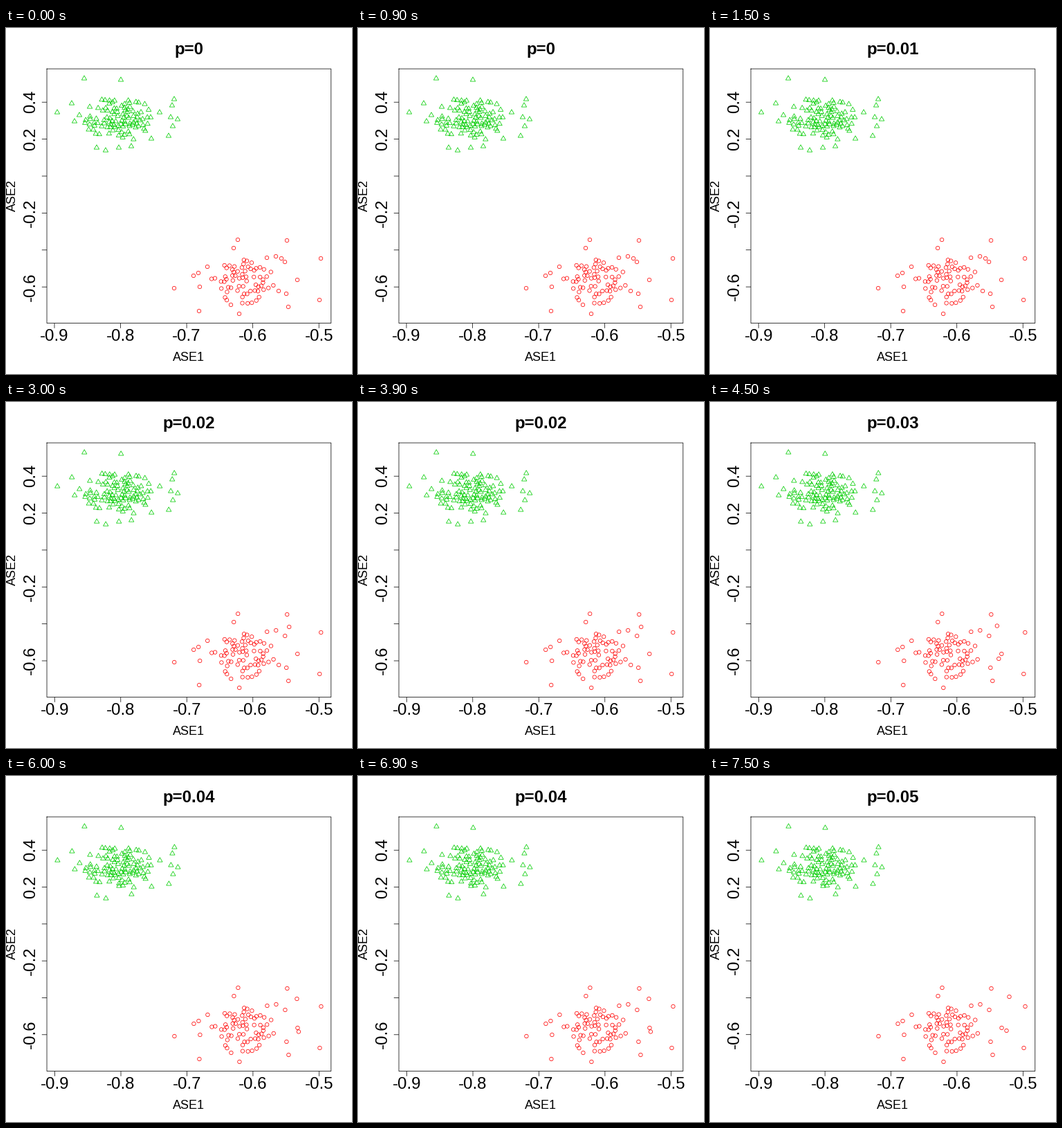
These frames come from a looping animation (500 px wide and 500 px high, 8 s). A matplotlib script:

```python
import numpy as np
import matplotlib.pyplot as plt
from matplotlib.animation import FuncAnimation
from matplotlib.collections import LineCollection, PolyCollection

PX = 0.72  # points per pixel at 100 dpi
LINE = 0.75 * PX
FONT = "Liberation Sans"
LEFT, TOP, RIGHT, BOTTOM = 59.04, 59.04, 469.76, 426.56
TICK = 7.2
STEPS = 6
FRAMES, INTERVAL = 16, 500

# Lone points around each cloud, in stage pixels.
GREEN_LONE = [
    (113, 72), (166, 74), (74, 121), (95, 108), (99, 134), (106, 125),
    (243, 102), (240, 111), (238, 128), (248, 131), (241, 141), (235, 155),
    (222, 121), (210, 159), (131, 172), (144, 176), (181, 170),
]
RED_LONE = [
    (243, 376), (279, 409), (271, 358), (278, 354), (280, 374), (291, 345),
    (335, 306), (329, 318), (325, 400), (337, 413), (377, 332), (390, 330),
    (403, 338), (406, 307), (455, 333), (453, 393), (421, 364), (408, 403),
    (405, 384),
]

RADIUS = 2.7
turn = np.linspace(0, 2 * np.pi, 28, endpoint=False)
CIRCLE = RADIUS * np.column_stack([np.cos(turn), np.sin(turn)])
# The visible middle of a triangle lies one pixel above its centroid.
TRIANGLE = RADIUS * np.array([(0, -1.555), (1.347, 0.778), (-1.347, 0.778)]) + (0, 1)


def cloud(lone, centre, spread, count, gap, seed):
    """Add normally spread points that keep a small gap from each other."""
    rng = np.random.default_rng(seed)
    points = [np.array(p, float) for p in lone]
    while len(points) < len(lone) + count:
        z = rng.normal(size=2)
        p = centre + z * spread
        if np.hypot(*z) < 1.9 and min(np.hypot(*(p - q)) for q in points) > gap:
            points.append(p)
    return np.array(points)


def route(step, keys, xs, ys):
    return np.interp(step, keys, xs), np.interp(step, keys, ys)


green = cloud(GREEN_LONE, (162, 130), (27, 18), 97, 3.5, 11)
red = cloud(RED_LONE, (343, 366), (25, 17), 65, 4, 5)

fig = plt.figure(figsize=(5, 5), dpi=100, facecolor="white")
ax = fig.add_axes([0, 0, 1, 1])
ax.set_xlim(0, 500)
ax.set_ylim(500, 0)
ax.axis("off")


def label(x, y, text, size, **style):
    return ax.text(x, y, text, size=size * PX, family=FONT, color="black",
                   ha="center", va="baseline", rotation_mode="anchor", **style)


def outlines(color):
    return ax.add_collection(PolyCollection(
        [], facecolors="none", edgecolors=color, linewidths=LINE))


ax.plot([LEFT, RIGHT, RIGHT, LEFT, LEFT], [TOP, TOP, BOTTOM, BOTTOM, TOP],
        color="black", lw=LINE, solid_joinstyle="miter", snap=False)
ticks = ax.add_collection(LineCollection([], colors="black", linewidths=LINE))
ticks.set_snap(False)

mid_x, mid_y = (LEFT + RIGHT) / 2, (TOP + BOTTOM) / 2
title = label(mid_x, 37.8, "", 24, weight="bold")
label(mid_x, 481.3, "ASE1", 18)
label(13.8, mid_y - 0.8, "ASE2", 18, rotation=90)
x_labels = [label(0, 452.4, f"-0.{9 - i}", 24) for i in range(5)]
y_labels = [label(42.2, 0, text, 24, rotation=90)
            for text in ("0.4", "0.2", "", "-0.2", "", "-0.6")]

triangles = outlines("#00CD00")
circles = outlines("#FF0000")


def place(marks, points, shape, shift):
    centres = np.asarray(points) + (shift, 0)
    marks.set_verts(centres[:, None, :] + shape)


def draw(frame):
    step = min(frame // 3, STEPS - 1)
    title.set_text(f"p={step / 100:g}")

    # The axes rescale slightly at each step.
    xs = 70.0 + 0.15 * step + (95.55 - 0.03 * step) * np.arange(5)
    ys = 107.2 + (53.4 - 0.02 * step) * np.arange(6)
    ticks.set_segments([[(x, BOTTOM), (x, BOTTOM + TICK)] for x in xs]
                       + [[(LEFT - TICK, y), (LEFT, y)] for y in ys])
    for text, x in zip(x_labels, xs):
        text.set_x(x)
    for text, y in zip(y_labels, ys):
        text.set_y(y - 0.4)

    # Three points wander off or jump as p grows.
    high = route(step, [1, 2, 4, 5], [398, 409, 420, 432], [333, 325, 322, 319])
    low = route(step, [2, 3, 5], [394, 417, 428], [380, 371, 368])
    jump = (163, 172 if step < 4 else 158)

    shift = 0.1 * step
    place(triangles, np.vstack([green, jump]), TRIANGLE, shift)
    place(circles, np.vstack([red, high, low]), CIRCLE, shift)
    return [title, ticks, triangles, circles, *x_labels, *y_labels]


anim = FuncAnimation(fig, draw, frames=FRAMES, interval=INTERVAL,
                     repeat=True, repeat_delay=0, blit=False)
plt.show()
```
